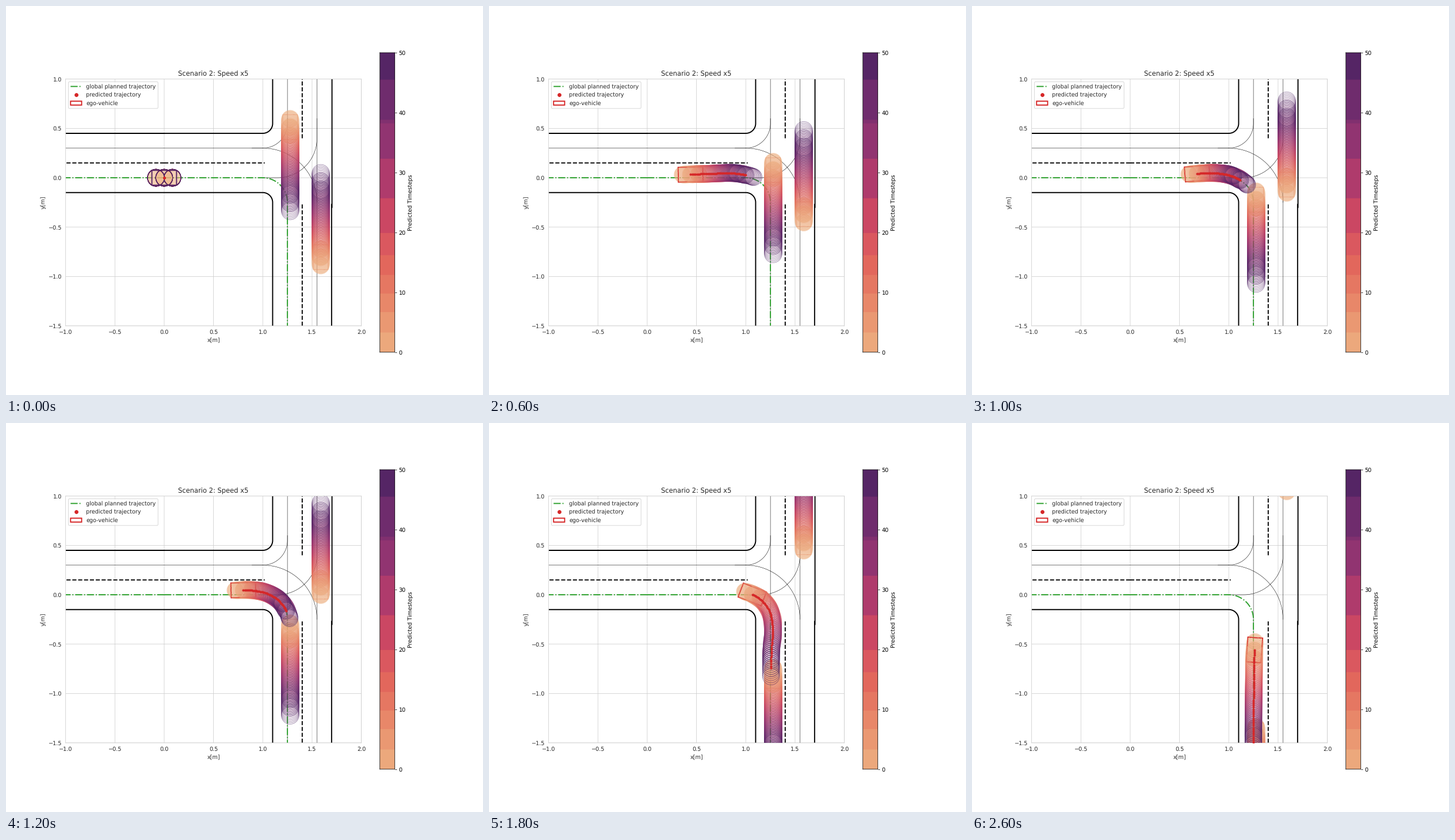
A matplotlib script that plays this animation: 829x675 px, repeating every 2700 ms.

```python
import numpy as np
import matplotlib.pyplot as plt
from matplotlib.animation import FuncAnimation
from matplotlib.collections import PolyCollection
from matplotlib.colors import LinearSegmentedColormap
from matplotlib.lines import Line2D
from matplotlib.patches import Patch, Polygon

W, H = 829, 675
DPI = W / 12
FRAMES, INTERVAL = 27, 100
STEPS = 51
CAR_LEN, CAR_WID = 0.25, 0.15
EGO_R, OBS_R = 0.0858, 0.0895
RED, GREEN, INK, GREY = "tab:red", "tab:green", "0.15", "0.8"

FLARE = LinearSegmentedColormap.from_list("warm", [
    "#edb081", "#e98d6b", "#e3685c", "#d14a61",
    "#b13c6c", "#8f3371", "#6c2b6d", "#4b2362"])

plt.rcParams.update({"font.family": "DejaVu Sans", "text.hinting": "none",
                     "path.snap": False})


def hermite(t, ts, ys):
    """Smooth curve through the points (ts, ys)."""
    ts, ys = np.asarray(ts, float), np.asarray(ys, float)
    m = np.gradient(ys, ts, axis=0)
    j = np.clip(np.searchsorted(ts, t, "right") - 1, 0, len(ts) - 2)
    h = ts[j + 1] - ts[j]
    x = (t - ts[j]) / h
    if ys.ndim > 1:
        x, h = x[:, None], h[:, None]
    return ((1 + 2 * x) * (1 - x) ** 2 * ys[j] + x * (1 - x) ** 2 * h * m[j]
            + x * x * (3 - 2 * x) * ys[j + 1] + x * x * (x - 1) * h * m[j + 1])


# Driven path, measured by arc length
WAY = np.array([
    (0, 0), (.2, .011), (.44, .033), (.68, .043), (.8, .047), (.915, .042),
    (1.066, .003), (1.19, -.088), (1.247, -.186), (1.273, -.34),
    (1.26, -.559), (1.255, -.85), (1.25, -1.3), (1.25, -1.9)])
chord = np.r_[0, np.cumsum(np.hypot(*np.diff(WAY, axis=0).T))]
fine = np.linspace(0, chord[-1], 1500)
path = hermite(fine, chord, WAY)
arc = np.r_[0, np.cumsum(np.hypot(*np.diff(path, axis=0).T))]
slope = np.unwrap(np.arctan2(*np.gradient(path, axis=0).T[::-1]))

# Ego progress, heading and look-ahead distance over simulation steps
KNOTS = [0, 29, 49, 69, 89, 109, 129]
PROGRESS = np.interp(chord[[0, 2, 3, 5, 6, 8, 10]], fine, arc)
HEADING = np.radians([0, 1, 4.5, -4.4, -21, -64, -94])
AHEAD = [.68, .56, .45, .575, .83, .965, .955]


def on_path(u):
    return np.column_stack([np.interp(u, arc, path[:, 0]),
                            np.interp(u, arc, path[:, 1])])


def ego_prediction(k, s):
    u0 = hermite(s, KNOTS, PROGRESS)
    i = np.arange(STEPS + 1)
    if k == 0:
        dist = np.zeros(STEPS + 1)
    else:
        v = (hermite(s + 1, KNOTS, PROGRESS) - hermite(s - 1, KNOTS, PROGRESS)) / 2
        total = np.interp(s, KNOTS, AHEAD)
        dist = v * i + (total - v * STEPS) * (i / STEPS) ** 2
    angle = np.interp(u0 + dist, arc, slope)
    angle += (hermite(s, KNOTS, HEADING) - angle[0]) * np.exp(-dist / .12)
    return on_path(u0 + dist), angle


def obstacle_prediction(x, y, way, s):
    i = np.arange(STEPS + 1)
    pos = np.column_stack([np.full(STEPS + 1, x), y + way * .015 * (s + i)])
    return pos, np.full(STEPS + 1, way * np.pi / 2)


def arc_points(cx, cy, r, a0, a1):
    a = np.radians(np.linspace(a0, a1, 40))
    return list(zip(cx + r * np.cos(a), cy + r * np.sin(a)))


# A hair over the size keeps the pixel count from rounding down
fig = plt.figure(figsize=((W + 1e-4) / DPI, (H + 1e-4) / DPI), dpi=DPI,
                 facecolor="white")
ax = fig.add_axes([.125, .11, .62, .77])
ax.set_aspect("equal")
ax.set_xlim(-1, 2)
ax.set_ylim(-1.5, 1)
ax.set_xticks(np.arange(-1, 2.1, .5))
ax.set_yticks(np.arange(-1.5, 1.1, .5))
ax.set_axisbelow(True)
ax.grid(color=GREY, lw=.8)
ax.tick_params(length=0, pad=7, labelcolor=INK)
for spine in ax.spines.values():
    spine.set_color(GREY)
ax.set_title("Scenario 2: Speed x5", color=INK)
ax.set_xlabel("x[m]", color=INK)
ax.set_ylabel("y[m]", color=INK)


class Vehicle:
    """A box, its covering discs and the rings of its predicted motion."""

    def __init__(self, radius, edge, lw):
        turn = np.linspace(0, 2 * np.pi, 48, endpoint=False)
        self.circle = radius * np.column_stack([np.cos(turn), np.sin(turn)])
        shades = FLARE(np.arange(STEPS) / (STEPS - 1))
        shades[:, 3] = .52
        self.discs = self.shapes(fc=(*FLARE(0.)[:3], .6), ec="none")
        self.box = ax.add_patch(Polygon(np.zeros((4, 2)), fill=False, ec=edge,
                                        lw=lw, zorder=3))
        self.rings = self.shapes(fc="none", ec=np.repeat(shades, 3, axis=0))

    @staticmethod
    def shapes(fc, ec):
        return ax.add_collection(PolyCollection(
            [], facecolors=fc, edgecolors=ec, linewidths=.95, zorder=3),
            autolim=False)

    def place(self, pos, angle):
        axis = np.column_stack([np.cos(angle), np.sin(angle)])
        shift = np.array([-1, 0, 1]) * CAR_LEN / 3
        centres = (pos[:, None] + shift[None, :, None] * axis[:, None]).reshape(-1, 1, 2)
        circles = centres + self.circle
        self.discs.set_verts(circles[:3])
        self.rings.set_verts(circles[3:])
        along = axis[0] * CAR_LEN / 2
        side = np.array([-axis[0, 1], axis[0, 0]]) * CAR_WID / 2
        self.box.set_xy([pos[0] + a * along + b * side
                         for a, b in ((-1, -1), (1, -1), (1, 1), (-1, 1))])


south = Vehicle(OBS_R, FLARE(.12), .7)
north = Vehicle(OBS_R, FLARE(.12), .7)
ego = Vehicle(EGO_R, RED, 2)


def road(points, lw=2, ls="-", color="black"):
    ax.plot(*zip(*points), color=color, lw=lw, ls=ls)


# Road edges
road([(-1, .45), (0, .45)])
road([(-1, .45)] + arc_points(1, .55, .1, -90, 0) + [(1.1, 1)])
road([(-1, -.15)] + arc_points(1, -.25, .1, 90, 0) + [(1.1, -1.5)])
road([(1.702, 1), (1.702, -.3)])
road([(1.698, -.27), (1.698, -1.5)])

# Lane dividers
road([(0, .15), (-1, .15)], ls="--")
road([(0, .15), (1.02, .15)], ls="--")
road([(1.4, .4), (1.4, 1)], ls="--")
road([(1.4, -.27), (1.4, -1.5)], ls="--")

# Lane centres
THIN = .55
road([(-1, .3), (1, .3)], THIN)
road([(.89, .3)] + arc_points(1, .55, .25, -90, 0) + [(1.25, .6)], THIN)
road(arc_points(1, -.25, .55, 90, 0), THIN)
road([(1, 0)] + arc_points(1.15, .4, .4, -90, 0) + [(1.55, .6)], THIN)
road([(1.25, 1), (1.25, -1.5)], THIN)
road([(1.55, 1), (1.55, -1.5)], THIN)

# Planned route
road([(0, 0), (-1, 0)], ls="-.", color=GREEN)
road([(0, 0)] + arc_points(1, -.25, .25, 90, 0) + [(1.25, -1.5)],
     ls="-.", color=GREEN)
trail, = ax.plot([], [], "o", color=RED, ms=3.2, zorder=4)

ax.legend(handles=[
    Line2D([], [], color=GREEN, lw=2, ls="-.", label="global planned trajectory"),
    Line2D([], [], color=RED, marker="o", ls="none", label="predicted trajectory"),
    Patch(fill=False, ec=RED, lw=2, label="ego-vehicle")],
    loc="upper left", fontsize=10, labelcolor=INK, edgecolor=GREY)

# Colour scale in uneven bands
cax = fig.add_axes([.78375, .11, 26 / W, .77])
BANDS = [0, 3.3, 6.7, 9.8, 12.9, 16.2, 19.9, 25.7, 32.3, 38.2, 38.8, 45.5, 50]
for lo, hi in zip(BANDS, BANDS[1:]):
    cax.axhspan(lo, 50, color=FLARE((lo + hi) / 100), lw=0)
cax.set_xlim(0, 1)
cax.set_ylim(0, 50)
cax.set_xticks([])
cax.yaxis.tick_right()
cax.yaxis.set_label_position("right")
cax.set_yticks(range(0, 51, 10))
cax.set_ylabel("Predicted Timesteps")


def update(k):
    s = max(5 * k - 1, 0)
    south.place(*obstacle_prediction(1.2775, .513, -1, s))
    north.place(*obstacle_prediction(1.588, -.804, 1, s))
    pos, angle = ego_prediction(k, s)
    ego.place(pos, angle)
    ego.box.set_edgecolor(FLARE(.95) if k == 0 else RED)
    trail.set_data(pos[:, 0], pos[:, 1])
    return []


anim = FuncAnimation(fig, update, frames=FRAMES, interval=INTERVAL,
                     init_func=lambda: update(0), repeat=True, repeat_delay=0)
plt.show()
```
